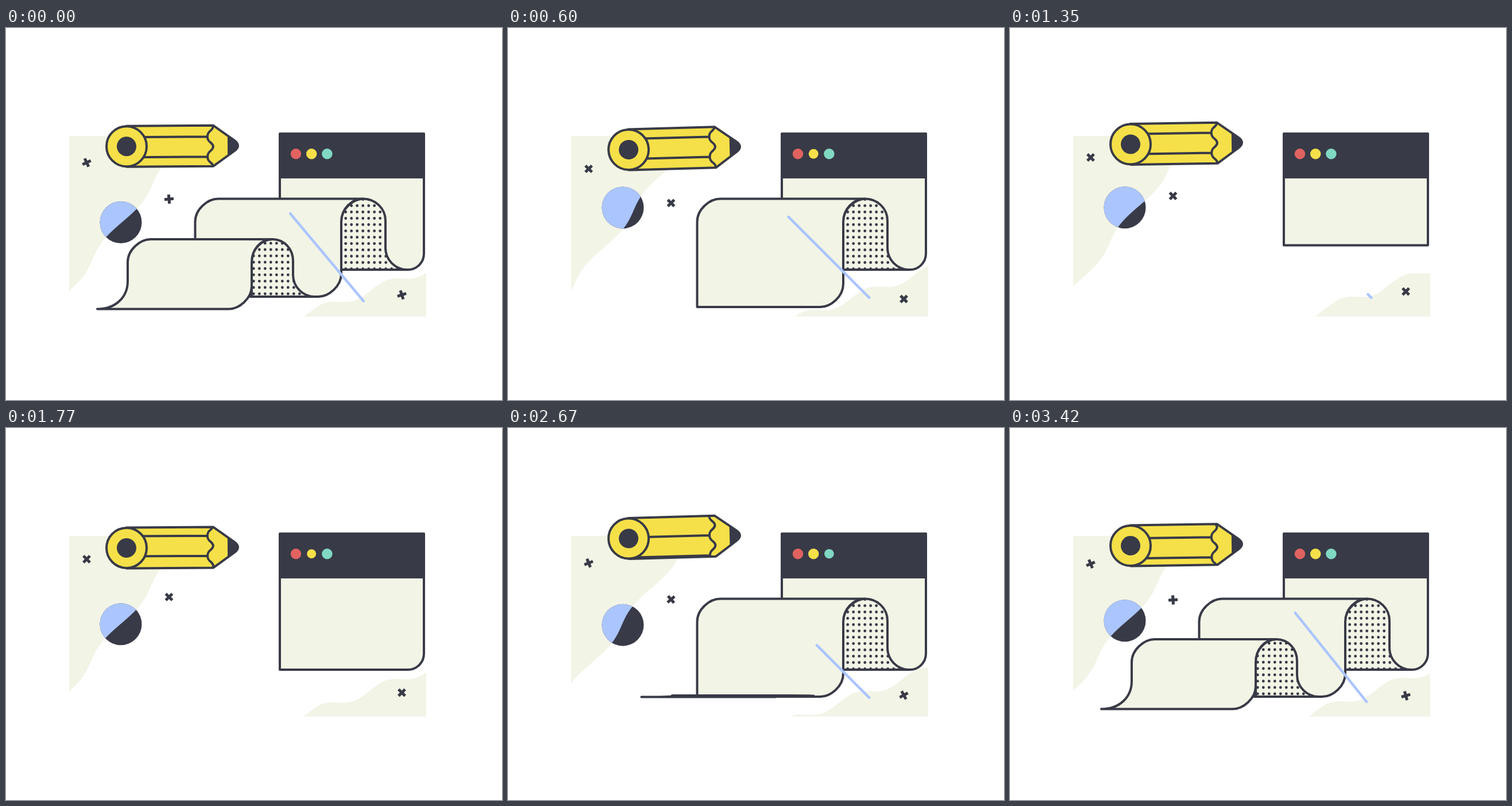
Write an HTML page with a canvas that moves like this. It is 864x648 px and loops after 3450 ms.

```html
<!DOCTYPE html>
<html lang="en">
<head>
<meta charset="utf-8">
<title>Pencil and paper</title>
<style>
  html, body { margin: 0; height: 100%; overflow: hidden; background: #fff; }
  canvas { display: block; }
</style>
</head>
<body>
<canvas id="stage" width="864" height="648"></canvas>
<script>
const ctx = document.getElementById('stage').getContext('2d');
const LOOP = 3450, TAU = Math.PI * 2;
const DARK = '#383a47', CREAM = '#f2f4e6', BLUE = '#abc5fe';
const YELLOW = '#f5e049', RED = '#e06360', TEAL = '#80d8c3';

// Smoothstep from 0 to 1, clamped at both ends.
function smooth(x) {
  x = Math.min(1, Math.max(0, x));
  return x * x * (3 - 2 * x);
}

const ease = (t, from, to) => smooth((t - from) / (to - from));

// 1 at first, eases to 0, then back to 1.
const outAndIn = (t, out0, out1, in0, in1) => 1 - ease(t, out0, out1) + ease(t, in0, in1);

// Eased rise and fall around a moment, wrapping around the loop.
function bump(t, center, width) {
  const d = Math.abs(t - center);
  return smooth(1 - Math.min(d, LOOP - d) / width);
}

// Cosine making n cycles per loop, with its peak at the given phase.
const wave = (t, n, peak) => Math.cos(TAU * (n * t / LOOP - peak));

// Short stretch of the whole paper when the last sheet lands.
const pop = t => bump(t, 3060, 160);

function disc(x, y, r, color) {
  ctx.beginPath();
  ctx.arc(x, y, r, 0, TAU);
  ctx.fillStyle = color;
  ctx.fill();
}

function paint(path, fill) {
  ctx.fillStyle = fill;
  ctx.fill(path);
  ctx.stroke(path);
}

function drawBlobs(t) {
  const left = new Path2D(), right = new Path2D();
  left.moveTo(110, 188);
  for (let y = 188; y <= 475; y += 2) {
    const x = 193 - 0.8 * (y - 350) + 7.5 * wave(t, -2, (435 - y) / 130);
    left.lineTo(Math.max(110, x), y);
  }
  right.moveTo(732, 502.5);
  for (let x = 732; x >= 480; x -= 2) {
    const y = 477.5 - 0.37 * (x - 580) + 7.5 * wave(t, 2, (831 / 4 + 401 - x) / 110);
    right.lineTo(x, Math.min(502.5, y));
  }
  ctx.fillStyle = CREAM;
  ctx.fill(left);
  ctx.fill(right);

  // The ball is blue only where it overlaps the blob.
  const ballY = 327.5 + 16 * wave(t, 4, 0.13);
  disc(200, ballY, 36.5, DARK);
  ctx.save();
  ctx.clip(left);
  disc(200, ballY, 36.5, BLUE);
  ctx.restore();
}

function drawPencil(t) {
  ctx.save();
  ctx.translate(400, 197.7 + 10.5 * wave(t, 6, 0.13));
  ctx.rotate(0.032 * wave(t, 5, 0.285));
  const body = new Path2D('M-190-35.5H-39L-2-9Q10 0-2 9L-39 35.5H-190Z');
  ctx.fillStyle = YELLOW;
  ctx.fill(body);

  ctx.save();
  ctx.clip(body);
  const roll = -12 + 10.8 * wave(t, 6, 0.69);
  ctx.beginPath();
  for (let y = roll - 35; y < 75; y += 35) {
    ctx.moveTo(-190, y);
    ctx.lineTo(-49, y);
    ctx.moveTo(-39, y - 17.5);
    ctx.bezierCurveTo(-40, y - 9, -49, y - 11, -49, y);
    ctx.bezierCurveTo(-49, y + 11, -40, y + 9, -39, y + 17.5);
  }
  ctx.stroke();
  ctx.fillStyle = DARK;
  ctx.fillRect(-14, -30, 30, 60);
  ctx.restore();

  ctx.stroke(body);
  disc(-190, 0, 35, YELLOW);
  ctx.stroke();
  disc(-190, 0, 17, DARK);
  ctx.restore();
}

// Dotted underside of the paper between two sheets.
function drawFold(c, i, top, bottom, dotX, dotY) {
  const r = Math.min(38, (bottom - top) / 2), mid = (c + i) / 2;
  const back = new Path2D();
  back.moveTo(c, bottom);
  back.lineTo(c, top + r);
  back.bezierCurveTo(c, top + r * 0.45, mid - 17, top, mid, top);
  back.bezierCurveTo(mid + 21, top, i, top + r * 0.45, i, top + r);
  back.lineTo(i, bottom - r);
  back.bezierCurveTo(i, bottom - r * 0.45, i + r * 0.45, bottom, i + r, bottom);
  back.closePath();
  ctx.fillStyle = CREAM;
  ctx.fill(back);
  ctx.save();
  ctx.clip(back);
  for (let x = c + dotX; x < i + r; x += 10)
    for (let y = bottom - dotY; y > top; y -= 11) disc(x, y, 2.4, DARK);
  ctx.restore();
  ctx.stroke(back);
}

// Front sheet; mid is where its top edge bends into the fold.
function drawSheet(l, r, mid, top, bottom, flare) {
  const h = bottom - top, rad = Math.min(40, h / 2), k = 0.45;
  const p = new Path2D();
  p.moveTo(l - flare, bottom);
  if (flare) {
    p.bezierCurveTo(l - flare * 0.35, bottom, l, bottom - h * 0.19, l, bottom - h * 0.4);
  }
  p.lineTo(l, top + rad);
  p.bezierCurveTo(l, top + rad * k, l + rad * (1 - k), top, l + rad, top);
  p.lineTo(mid, top);
  p.bezierCurveTo(mid - 21, top, r, top + rad * k, r, top + rad);
  p.lineTo(r, bottom - rad);
  p.bezierCurveTo(r, bottom - rad * k, r - rad * (1 - k), bottom, r - rad, bottom);
  p.closePath();
  paint(p, CREAM);
}

function drawWindow(t) {
  const y = 182.5 + 10 * pop(t);
  const shrink = bump(t, 1380, 330);
  const body = new Path2D();
  body.roundRect(477, y + 77, 251, 344 - y - 43.5 * shrink, [0, 0, 28 * (1 - shrink), 0]);
  paint(body, CREAM);
  const header = new Path2D();
  header.rect(477, y + 1.5, 251, 76);
  paint(header, DARK);
  [RED, YELLOW, TEAL].forEach((color, i) => {
    const phase = (3 * t / LOOP) % 1;
    const dip = smooth(1 - Math.abs(phase - 0.81 + 0.205 * i) / 0.13);
    disc(505 + 27.2 * i, y + 36.7, 9.2 - 2.5 * dip, color);
  });
}

function drawPaper(t) {
  const first = outAndIn(t, 650, 1080, 2200, 2600);
  const second = outAndIn(t, 150, 560, 2640, 3000);
  const bottom = 421 + 47 * first + 18 * bump(t, 600, 350);
  if (first > 0) {
    const shift = 120 * (1 - first) + 10 * pop(t);
    const c = 584 + shift * 0.35, i = 661 + shift * 0.2, top = 421 - 123.5 * first;
    drawFold(c, i, top, 421, 7.7, 1.5);
    drawSheet(329.5 + shift, c, (c + i) / 2, top, bottom, 0);
  }
  if (second > 0) {
    const shift = 75 * (1 - second) + 13 * pop(t);
    const c = 428 + shift * 0.53, i = 500 + shift * 0.45, top = bottom - 100 * second;
    drawFold(c, i, top, bottom, 3.3, 5);
    drawSheet(212 + shift, c, (c + i) / 2, top, bottom + 21.5 * second, 53);
  }
}

function drawBlueLine(t) {
  const shown = outAndIn(t, 650, 1450, 2250, 2950);
  if (shown <= 0) return;
  ctx.save();
  ctx.translate(559, 399.5);
  ctx.rotate((45 + 9 * bump(t, 3300, 330)) * TAU / 360);
  ctx.strokeStyle = BLUE;
  ctx.lineWidth = 4.5;
  ctx.beginPath();
  ctx.moveTo(99.5 - 199 * shown, 0);
  ctx.lineTo(99.5, 0);
  ctx.stroke();
  ctx.restore();
}

// A cross that dips by the given distance and turns upright around a moment.
function drawPlus(t, x, y, dip, upright) {
  const bob = bump(t, 3060, 600) + 0.62 * bump(t, 600, 600) + 0.33 * bump(t, 2160, 600);
  ctx.save();
  ctx.translate(x, y + dip * bob);
  ctx.rotate((1 + bump(t, upright, 760)) * TAU / 8);
  ctx.fillStyle = DARK;
  ctx.fillRect(-8, -2.5, 16, 5);
  ctx.fillRect(-2.5, -8, 5, 16);
  ctx.restore();
}

function frame(now) {
  const t = now % LOOP;
  ctx.fillStyle = '#fff';
  ctx.fillRect(0, 0, 864, 648);
  ctx.strokeStyle = DARK;
  ctx.lineWidth = 4;
  ctx.lineJoin = ctx.lineCap = 'round';
  drawBlobs(t);
  drawPencil(t);
  drawWindow(t);
  drawPaper(t);
  drawBlueLine(t);
  drawPlus(t, 140.5, 225.5, 32, 3040);
  drawPlus(t, 284, 292.5, 20, 3290);
  drawPlus(t, 689.5, 459, 21, 3120);
  requestAnimationFrame(() => frame(performance.now() - start));
}

const start = performance.now();
frame(0);
</script>
</body>
</html>
```
